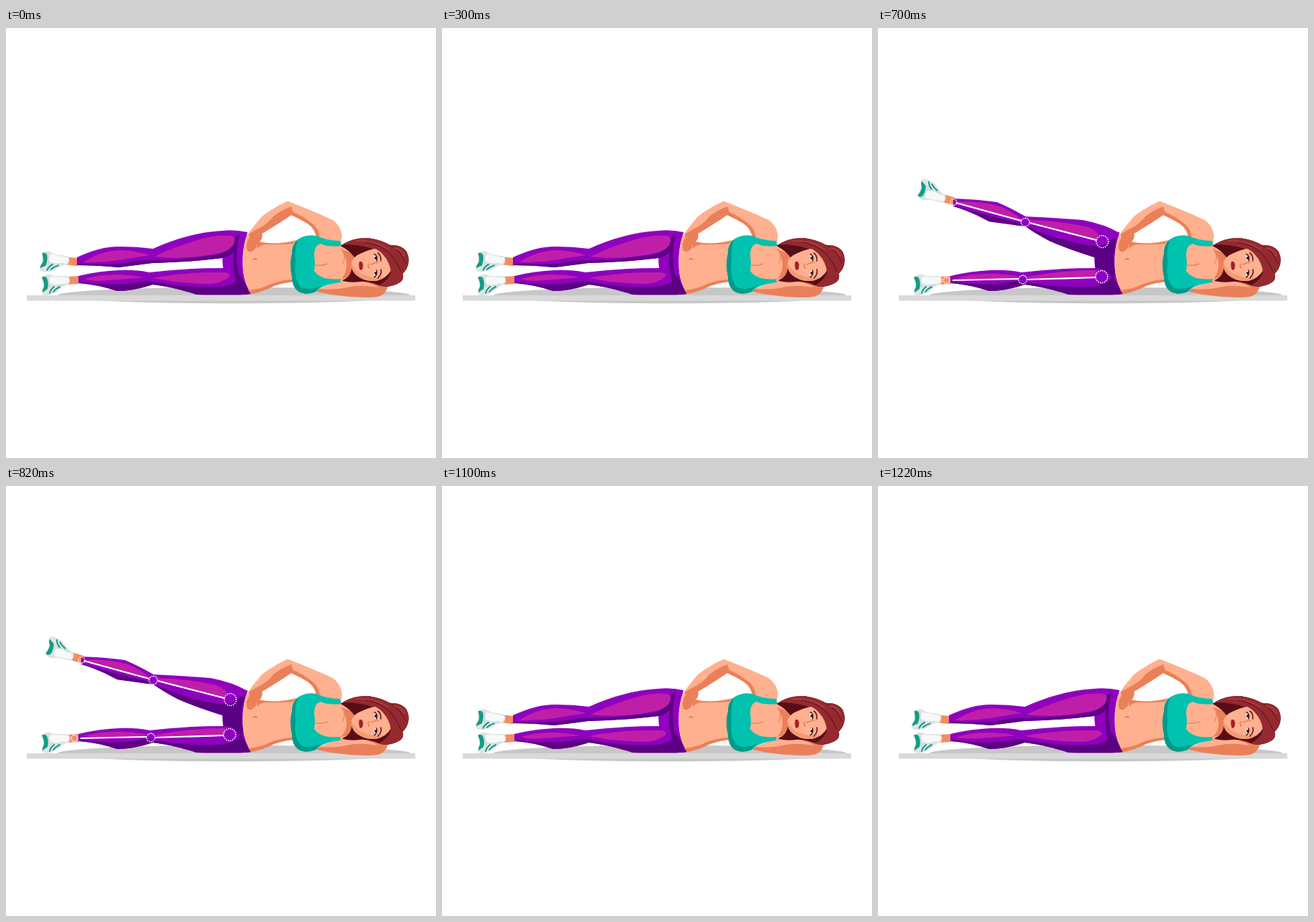
Recreate the animation shown at these times as an HTML page. Size 600 px wide and 600 px high, loop 1300 ms.

```html
<!DOCTYPE html>
<html lang="en">
<head>
<meta charset="utf-8">
<title>Side leg raise</title>
<style>
  html, body { margin: 0; width: 100%; height: 100%; overflow: hidden; background: #fff; }
  svg { display: block; width: 100vw; height: 100vh; }

  .skin { fill: #ffb08f; }
  .tan { fill: #ea8059; }
  .base { fill: #8f00bf; }
  .glow { fill: #bf1fa8; }
  .deep { fill: #5c0083; }
  .teal { fill: #00c2ae; }
  .sea { fill: #009a89; }
  .hair { fill: #942a30; }
  .dark { fill: #590d17; }
  .line { fill: none; stroke-linecap: round; stroke-linejoin: round; }
  .bone { fill: none; stroke: #fff; stroke-width: 2.2; }
  .dots { fill: none; stroke: #fff; stroke-width: 1.8; stroke-linecap: round; stroke-dasharray: 0 1; }

  /* Hard cuts at 500, 700, 900 and 1100 ms */
  .pose { visibility: hidden; animation: 1300ms step-end infinite; }
  .rest { animation-name: rest; }
  .low { animation-name: low; }
  .high { animation-name: high; }
  .work { animation-name: work; }
  @keyframes rest {
    0%, 84.61538% { visibility: visible; }
    38.46154% { visibility: hidden; }
  }
  @keyframes low {
    0%, 53.84615%, 84.61538% { visibility: hidden; }
    38.46154%, 69.23077% { visibility: visible; }
  }
  @keyframes high {
    0%, 69.23077% { visibility: hidden; }
    53.84615% { visibility: visible; }
  }
  @keyframes work {
    0%, 84.61538% { visibility: hidden; }
    38.46154% { visibility: visible; }
  }
</style>
</head>
<body>
<svg viewBox="0 0 600 600">
  <defs>
    <g id="foot">
      <path fill="#f18d62" d="M86 347 L102 346 V357 L86 358Z"/>
      <path fill="#dde4e5" d="M50 348 Q56 342 62 344 Q67 347 76 346 L87 346 Q91 352 88 357 Q80 360 76 364 Q70 370 62 372 Q52 375 50 370 Q54 360 50 348Z"/>
      <path fill="#129c86" d="M50 348 Q54 345 57 349 Q60 356 58 364 L51 369 Q50 366 53 361 Q54 356 50 348Z"/>
      <path fill="#f7f8f8" d="M63 347 L87 348 Q89 352 86 356 L73 359 Q65 361 61 357 Q59 350 63 347Z"/>
      <path class="line" stroke="#129c86" stroke-width="2" d="M61 370 Q62 365 67 361 M66 368 Q69 364 75 361"/>
      <path class="line" stroke="#c8d1d2" d="M56 346 Q62 353 61 362 M62 358 Q70 361 81 357"/>
    </g>
    <circle id="ankle" class="dots" r="4.3" pathLength="9"/>
    <circle id="knee" class="dots" r="5.8" pathLength="13"/>
    <circle id="hip" class="dots" r="8.4" pathLength="18"/>
  </defs>

  <!-- Floor -->
  <ellipse cx="318" cy="373" rx="246" ry="11.3" fill="#c7c7c7"/>
  <rect x="29" y="373" width="542" height="7.5" fill="#d9d9d9"/>

  <!-- Lower leg and hips -->
  <use href="#foot"/>
  <path class="base" d="M101 346 Q130 339 157 338 Q181 337 200 341 Q250 335 303 335 L302 320 L310 284 L337 285 Q328 310 331 340 Q333 357 342 371 Q337 373 266 372 Q232 361 205 358 Q178 367 155 367 Q128 358 101 356Z"/>
  <path class="deep" d="M103 354 Q145 360 178 356 Q193 352 205 354 Q250 363 296 361 Q320 360 328 345 L341 371 Q337 373 266 372 Q232 361 205 358 Q178 367 155 367 Q128 358 103 356Z"/>
  <g class="pose rest">
    <path class="glow" d="M110 350 Q146 339 193 348 Q172 350 143 352 Q119 354 110 350Z"/>
    <path class="glow" d="M205 349 Q247 340 305 341 Q314 342 312 347 Q301 357 280 357 Q240 356 205 349Z"/>
  </g>
  <g class="pose work">
    <path class="deep" d="M302 320 Q316 312 325 293 L333 291 Q327 317 331 345 L324 347 Q320 334 303 335Z"/>
    <path class="glow" d="M109 349 Q147 338 195 346 L193 350 Q146 354 109 349Z"/>
    <path class="glow" d="M209 347 Q255 338 306 338 L304 348 Q255 353 209 349Z"/>
    <path class="bone" d="M104 352 L196 350 M208 351 L304 348"/>
    <use href="#ankle" x="95.500" y="352"/>
    <use href="#knee" x="202" y="351"/>
    <use href="#hip" x="312" y="347"/>
  </g>

  <!-- Torso -->
  <path class="skin" d="M336 288 Q350 299 367 300 Q386 301 404 296 L430 293 L469 302 L489 318 L486 347 L459 357 L404 353 Q388 355 374 360 Q357 369 342 371 Q333 357 331 340 Q329 309 336 288Z"/>
  <path class="tan" d="M342 371 L338 366 Q354 365 370 357 Q386 351 401 351 L404 354 Q388 355 374 360 Q357 369 342 371Z"/>
  <path class="tan" d="M350 298 Q375 304 404 297 L400 301 Q380 303 362 302 Q354 303 350 308Z"/>
  <path class="line" stroke="#d96f49" stroke-width="1.3" d="M345 323 Q348 321 350 323"/>

  <!-- Upper leg -->
  <g class="pose rest">
    <use href="#foot" transform="translate(-1 -26) rotate(10 95 352)"/>
    <path class="base" d="M99 320 Q133 304 160 305 Q183 305 205 308 Q253 286 300 283 Q320 281 337 285 Q328 310 330 335 L303 335 L302 321 Q252 327 204 328 Q181 331 157 334 Q128 331 99 331Z"/>
    <path class="deep" d="M101 329 Q147 331 172 327 Q190 323 205 324 Q257 323 300 315 Q314 309 321 290 L326 288 Q319 314 324 340 Q328 356 337 371 L326 371 Q320 354 318 337 Q316 326 318 312 Q312 319 302 321 Q252 327 204 328 Q181 331 157 334 Q128 331 101 331Z"/>
    <path class="glow" d="M108 327 Q131 311 159 310 Q178 310 201 317 Q180 320 157 324 Q132 328 108 327Z"/>
    <path class="glow" d="M207 319 Q238 304 270 295 Q295 288 315 290 Q322 293 317 303 Q311 312 294 315 Q246 324 207 319Z"/>
  </g>
  <g class="pose low">
    <use href="#foot" transform="matrix(1 0 0 -1 0 646)"/>
    <path class="base" d="M102 289 Q130 282 159 282 Q183 281 205 289 Q250 280 285 279 Q316 279 337 285 Q329 308 330 333 L303 321 Q244 322 205 306 Q181 312 157 311 Q131 302 102 300Z"/>
    <path class="deep" d="M104 299 Q151 303 199 303 Q233 311 283 313 Q320 313 326 294 L333 294 Q327 317 330 338 L303 321 Q244 322 205 306 Q181 312 157 311 Q131 302 104 300Z"/>
    <path class="glow" d="M109 292 Q146 284 178 288 Q193 290 198 295 L196 299 Q149 298 109 293Z"/>
    <path class="glow" d="M211 294 Q254 285 304 287 Q317 288 319 292 L305 301 Q250 302 211 298Z"/>
    <path class="bone" d="M106 295 L198 299.500 M210 300 L306 300.500"/>
    <use href="#ankle" x="101.500" y="294.500"/>
    <use href="#knee" x="204" y="299.500"/>
    <use href="#hip" x="315" y="301"/>
  </g>
  <g class="pose high">
    <use href="#foot" transform="translate(5 -54) rotate(13 95 294) matrix(1 0 0 -1 0 646)"/>
    <path class="base" d="M105 238 Q139 239 166 243 Q183 250 206 263 Q247 265 286 268 Q317 274 337 286 Q328 309 330 336 L302 320 Q266 309 239 297 Q220 287 206 277 Q185 274 155 270 Q130 256 105 249Z"/>
    <path class="deep" d="M107 248 Q151 262 200 273 Q235 291 285 302 Q318 309 327 293 L333 294 Q327 317 330 338 L302 320 Q266 309 239 297 Q220 287 206 277 Q185 274 155 270 Q130 256 107 249Z"/>
    <path class="glow" d="M112 242 Q147 242 171 249 Q189 257 200 267 L197 269 Q154 258 112 245Z"/>
    <path class="glow" d="M212 268 Q254 269 294 278 Q306 283 308 289 L305 296 Q259 285 212 271Z"/>
    <path class="bone" d="M109 244 L200 269 M212 272 L305 296"/>
    <use href="#ankle" x="105.500" y="243"/>
    <use href="#knee" x="205.500" y="271"/>
    <use href="#hip" x="313" y="298"/>
  </g>

  <!-- Arm resting on the hip -->
  <path class="skin" d="M338 287 Q346 276 357 263 Q374 250 393 241.500 Q428 255 456 268 Q467 276 469 290 L467 304 L433 295 Q433 282 421 273 Q409 266 398 261 Q382 272 357 287 Q359 293 354 298 Q349 300 349 306 Q343 315 337 311 Q333 302 340 291Z"/>
  <path class="tan" d="M398 249 Q384 254 373 263 Q364 275 348 282 L338 288 L340 292 Q333 302 337 311 Q343 315 349 306 Q349 300 354 298 Q359 293 357 287 Q382 272 398 261 Q409 266 421 273 Q433 282 433 294 L438 295 Q438 280 425 271 Q412 261 401 257Z"/>

  <!-- Chest and neck -->
  <path class="tan" d="M469 309 L491 318 L487 346 L468 350 Q482 334 469 309Z"/>
  <path class="line" stroke="#e68a63" stroke-width="1.4" d="M468 309 Q476 318 470 328 M432 331 Q442 332 448 329"/>

  <!-- Lower arm under the head -->
  <path class="tan" d="M432 367 Q448 358 470 353 L500 348 H536 Q534 363 528 370 Q522 376 507 376 Q482 376 462 373 Q445 371 432 367Z"/>
  <path class="skin" d="M437 364 Q455 355 479 353 Q504 352 519 362 Q497 358 480 361 Q459 366 437 364Z"/>

  <!-- Top -->
  <path class="teal" d="M405 297 Q416 287 433 290 Q448 297 466 297 L468 304 Q449 306 439 301 Q430 303 430 318 Q432 327 430 339 Q440 353 467 350 L466 355 Q441 358 432 368 Q418 374 407 367 Q399 360 399 347 Q395 329 399 315 Q399 303 405 297Z"/>
  <path class="sea" d="M405 297 L407 296 Q402 311 404 327 Q401 351 412 362 Q425 367 441 359 Q436 362 432 368 Q418 374 407 367 Q399 360 399 347 Q395 329 399 315 Q399 303 405 297Z"/>

  <!-- Hair behind the face -->
  <path class="dark" d="M467 304 Q481 293 505 293 Q523 295 536 303 Q552 302 559 312 Q565 324 559 336 Q555 342 553 343 Q557 352 546 357 Q531 364 520 359 Q505 353 494 354 Q478 356 469 352 Q478 349 481 341 L487 321 Q480 311 467 304Z"/>
  <path class="hair" d="M470 302 Q485 292 505 293 Q523 295 536 303 Q552 302 559 312 Q564 323 559 335 Q554 343 546 345 Q540 327 520 313 Q504 302 470 302Z"/>

  <!-- Face -->
  <path class="skin" d="M482 328 Q484 319 494 315 Q508 308 518 308 Q536 321 538 337 Q531 350 516 353 Q500 354 489 345 Q481 338 482 328Z"/>
  <path fill="#f49a75" d="M482 328 Q481 338 489 345 Q500 354 516 353 Q524 351 529 347 Q513 351 502 345 Q493 343 489 337 Q485 334 482 328Z"/>
  <path fill="#b3262d" d="M493 326 Q497 325 498 329 Q499 331 498 333 Q499 337 494 338 Q491 332 493 326Z"/>
  <path class="line" stroke="#711823" stroke-width=".8" d="M495 327 Q496 332 495 337"/>
  <path class="line" stroke="#d6704c" stroke-width="1.2" d="M506 329 Q504 332 507 335 M509 330 Q515 327 520 327"/>
  <g fill="#fff">
    <ellipse cx="515.500" cy="320.500" rx="2" ry="4"/>
    <ellipse cx="515.500" cy="342.500" rx="2" ry="4"/>
  </g>
  <g fill="#351a20">
    <circle cx="516" cy="321" r="2"/>
    <circle cx="516" cy="342" r="2"/>
  </g>
  <path class="line" stroke="#351a20" stroke-width="1.5" d="M514 315.500 Q519 318 517 325 M517 338 Q519 343 514 348"/>
  <path class="line" stroke="#6d1823" stroke-width="1.7" d="M519 314 Q524 318 523 325 M523 337 Q525 343 519 349"/>

  <!-- Fringe and bun -->
  <path class="hair" d="M504 304 Q524 301 541 317 Q552 329 554 344 Q556 353 546 357 Q533 363 521 359 Q533 352 537 342 Q537 328 525 315 Q517 307 504 304Z"/>
  <path class="line" stroke="#6d1823" stroke-width="1.3" d="M502 299 Q536 303 551 340 M536 303 Q549 309 558 328"/>
  <path class="line" stroke="#b14443" stroke-width="1.3" d="M490 297 Q515 296 534 309 M542 307 Q553 309 556 318"/>
</svg>
</body>
</html>
```
